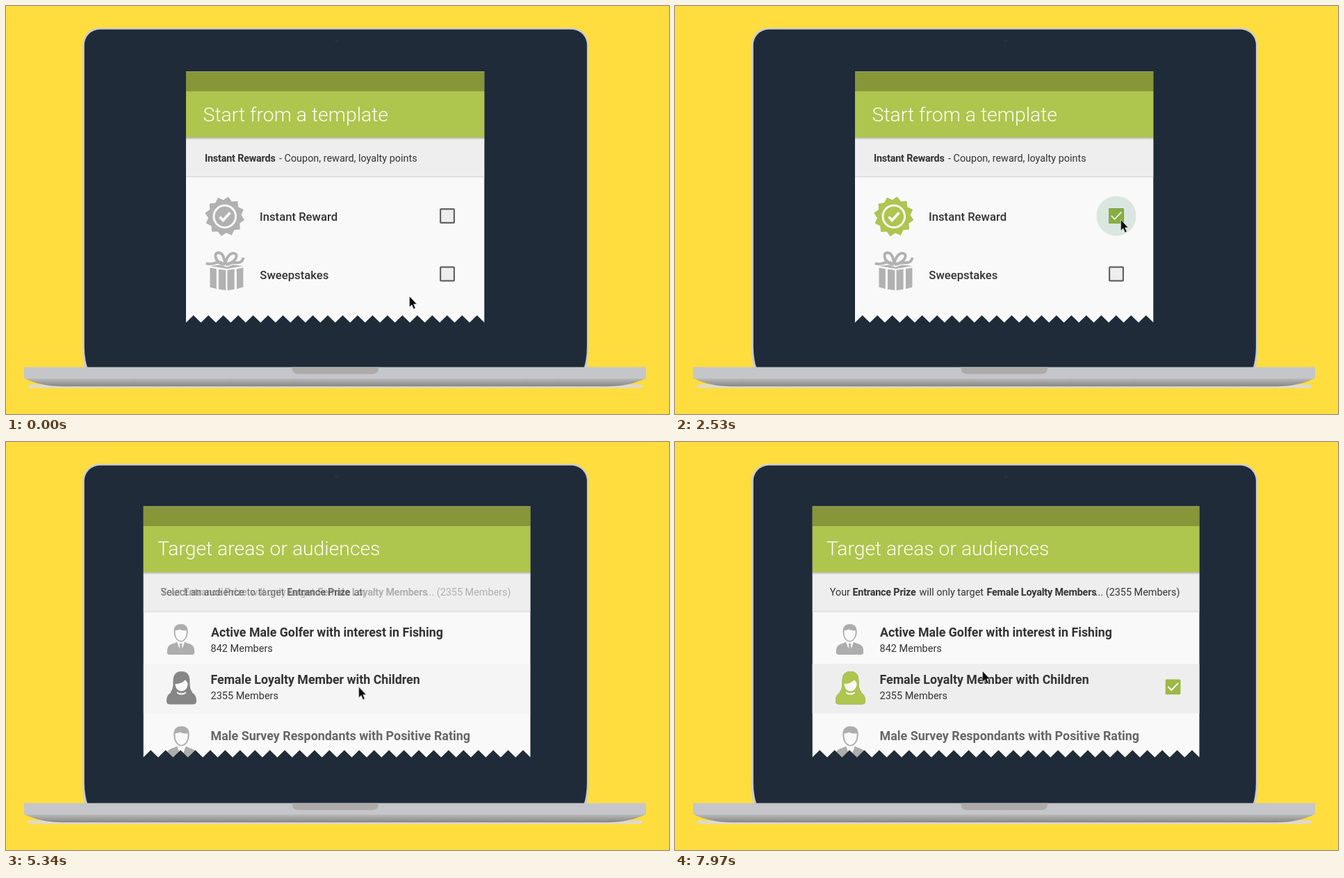
An HTML page that plays this animation: 954x587 px, repeating every 8000 ms.

```html
<!DOCTYPE html>
<html lang="en">
<head>
<meta charset="utf-8">
<title>Campaign setup</title>
<style>
  html, body { margin: 0; width: 100%; height: 100%; overflow: hidden; background: #ffdd3f; }
  svg { display: block; width: 954px; height: 587px; }
  text { font-family: Roboto, sans-serif; white-space: pre; }
  .note [font-weight="700"] { letter-spacing: -.2px; }
</style>
</head>
<body>
<svg id="stage" viewBox="0 0 954 587" xmlns="http://www.w3.org/2000/svg"></svg>
<script>
const LOOP = 8000;
const GREEN = '#aec54e', TICK = '#9cb845', GREY = '#b1b1b1', INK = '#333', PAPER = '#f9f9f9';

const text = (x, y, size, weight, str, fill = INK) =>
  `<text x="${x}" y="${y}" font-size="${size}" font-weight="${weight}" fill="${fill}">${str}</text>`;

// A line of text in parts: [x, weight, string]
const note = (id, y, parts) =>
  `<g id="${id}" class="note">${parts.map(([x, w, s]) => text(x, y, 14.4, w, s)).join('')}</g>`;

const rect = (x, y, w, h, fill, more = '') =>
  `<rect x="${x}" y="${y}" width="${w}" height="${h}" fill="${fill}" ${more}/>`;

function sheetPath(x, y, w) {
  const n = Math.round(w / 21.45), step = w / n / 2, low = y + 361.5;
  let d = `M${x} ${y}H${x + w}V${low}`;
  for (let i = 2 * n - 1; i >= 0; i--) d += `L${x + i * step} ${i % 2 ? low - 10.5 : low}`;
  return d + 'Z';
}

function sheet(id, x, y, w, content) {
  return `<clipPath id="${id}-clip"><path d="${sheetPath(x, y, w)}"/></clipPath>
    <g id="${id}" clip-path="url(#${id}-clip)">
      ${rect(x, y, w, 364, PAPER)}
      ${rect(x, y + 95, w, 57, '#eee')}
      ${rect(x, y + 95, w, 3.5, 'url(#shade)')}
      ${rect(x, y + 151, w, 1.2, '#d8d8d8')}
      ${rect(x, y + 152.2, w, 1, '#efefef')}
      ${rect(x, y, w, 29, '#869639')}
      ${rect(x, y, w, 1, '#a0ab68')}
      ${rect(x, y + 28.7, w, 66.5, GREEN)}
      ${content}
    </g>`;
}

const emptyBox = (x, y) => rect(x + 1.1, y + 1.1, 19.8, 19.8, '#eee', 'rx="1" stroke="#636363" stroke-width="2.2"');

const tickedBox = (x, y) => rect(x, y, 21.7, 21.7, TICK, 'rx="1.5"') +
  `<path d="M${x + 3.7} ${y + 10.4}l4.9 5 9.7-10.1" fill="none" stroke="#fff" stroke-width="2"/>`;

function badge(fill) {
  const pts = Array.from({ length: 24 }, (_, i) => {
    const r = i % 2 ? 22.8 : 27.7, a = (i * 15 - 80) * Math.PI / 180;
    return `${(r * Math.cos(a)).toFixed(2)},${(r * Math.sin(a)).toFixed(2)}`;
  });
  return `<g transform="translate(314.8 302.8)" fill="none">
    <polygon points="${pts.join(' ')}" fill="${fill}" stroke="${fill}" stroke-width="1.6" stroke-linejoin="round"/>
    <circle r="15.8" stroke="${PAPER}" stroke-width="3"/>
    <path d="M-7.3.5l5 5L7.6-5.6" stroke="${PAPER}" stroke-width="3.8"/>
  </g>`;
}

const gift = `<g fill="${GREY}">
    <path d="M293.5 376.5l9.3 1.7v28.8l-9.3-2.4ZM306 378.7l10.3 1.4v29l-10.3-1.7ZM318.6 380l10-1.4v29l-10 1.6ZM332 378.2l9.4-1.7v28l-9.4 2.4Z"/>
    <path d="M294 374l14-1.6 9.5 3.4 9-3.4 15.5 1.6-24 4Z"/>
    <g fill="none" stroke="${GREY}" stroke-width="3.9">
      <path d="M315 372C301 370 298 356 305 355S315 364 315 372"/>
      <path d="M316 372C316 362 323 354 329 356S331 369 316 372"/>
      <path d="M313 372C305 363 298 375 288 370M319 372C327 365 339 375 341.5 362"/>
    </g>
  </g>`;

const man = (x, y, scale, tie) => `<g transform="translate(${x} ${y}) scale(${scale})" fill="#adadad">
    <path d="M-19.8 41Q-20.5 31-13 28.5Q-7 27-5 25H5Q7 27 13 28.5Q20.5 31 19.6 41Q19.5 44 16 44H-16Q-19.8 44-19.8 41Z"/>
    <path d="M-6 24.5L0 41 6 24.5Z" fill="${PAPER}"/>
    ${tie ? '<path d="M-2 28H2L1.2 31 2.3 36 0 41-2.3 36-1.2 31Z"/>' : ''}
    <path d="M0 0C7 0 10.5 4 10 12C9.6 20 5 25.5 0 25.5S-9.6 20-10 12C-10.5 4-7 0 0 0Z"/>
    <path d="M-8 9Q-4 9-2 7.5Q3 10 8 9C9 18 4.5 24 0 24S-9 18-8 9Z" fill="${PAPER}"/>
  </g>`;

const woman = fill => `<g transform="translate(252.5 330)" fill="${fill}">
    <path d="M-21.5 43Q-22 31-9 28H9Q22 31 21.5 43Q21.5 47.6 16 47.6H-16Q-21.5 47.6-21.5 43Z"/>
    <path d="M0 0C-10 0-12 7-12 15C-12 23-13 27-16 30Q-10 32-8 29H8Q10 32 16 30C13 27 12 23 12 15C12 7 10 0 0 0Z"/>
    <path d="M-9 18Q0 18 5 12.5Q8.500 14 9 18C9 25 4 28.500 0 28.500S-9 25-9 18Z" fill="${PAPER}"/>
    <path d="M-6.500 29.500Q0 33.500 6.500 29.500V31.500Q0 36-6.500 31.500Z" fill="${PAPER}"/>
  </g>`;

const laptop = `
  <path d="M113 521Q110.300 508 110.300 496V55.500A24 24 0 0 1 134.300 31.500H814A24 24 0 0 1 838 55.500V496Q838 508 835.500 521Z" fill="#c9cbd3"/>
  <path d="M117.500 521Q112.800 508 112.800 490V56A22.200 22.200 0 0 1 135 33.800H813.700A22.200 22.200 0 0 1 835.900 56V490Q835.900 508 831.500 521Z" fill="#1f2b38"/>
  <path d="M473.500 48.500l2 3 2.500-3" fill="none" stroke="#323c47"/>
  ${rect(32, 544.8, 884, 4.8, '#dcdad4', 'rx="2.4"')}
  <path d="M26 535.500H921C905 543 890 547 862 547.300H85C57 547 42 543 26 535.500Z" fill="url(#under)"/>
  ${rect(26, 519.5, 895, 16.5, '#c5c6ca')}
  <path d="M411.500 519.500H536V521Q536 529.500 527 529.500H420.500Q411.500 529.500 411.500 521Z" fill="#aeabab"/>`;

const templates = sheet('templates', 259, 94, 429.5,
  text(283.6, 165.6, 28.4, 300, 'Start from a template', '#fdfef8') +
  note('kinds', 224.3, [[286, 700, 'Instant Rewards'], [393, 400, '- Coupon, reward, loyalty points']]) +
  badge(GREY) + gift +
  text(365, 309.3, 16.7, 500, 'Instant Reward') +
  text(365.3, 392.5, 16.7, 500, 'Sweepstakes') +
  emptyBox(624, 291) + emptyBox(624, 374.5) +
  `<g id="reward">${badge(GREEN)}${tickedBox(624, 291.2)}</g>
   <circle id="ripple" cx="635" cy="302" r="28.6" fill="rgba(0,100,50,.12)"/>`);

const audiences = sheet('audiences', 197.5, 92.3, 557.2,
  `<g id="row">${rect(197, 319, 558, 71.5, '#eee')}</g>` +
  text(218, 162.6, 28.3, 300, 'Target areas or audiences', '#fdfef8') +
  note('ask', 221.3, [[222.4, 400, 'Select an audience to target'],
    [404.2, 700, 'Entrance Prize'], [500.4, 400, 'at:']]) +
  note('answer', 221.3, [[222.8, 400, 'Your'], [255.4, 700, 'Entrance Prize'],
    [351.4, 400, 'will only target'], [448.4, 700, 'Female Loyalty Members'],
    [604.8, 400, '... (2355 Members)']]) +
  man(251.6, 262, 1, true) + woman('#868686') + man(252.5, 409, 1.12, false) +
  text(295, 280.2, 17.8, 700, 'Active Male Golfer with interest in Fishing') +
  text(294.5, 301.6, 14.5, 400, '842 Members') +
  text(294.5, 348.2, 17.8, 700, 'Female Loyalty Member with Children') +
  text(294.5, 369.6, 14.5, 400, '2355 Members') +
  text(294.5, 429.2, 17.9, 700, 'Male Survey Respondants with Positive Rating', '#666') +
  `<g id="chosen">${woman(GREEN)}${tickedBox(705.7, 341.6)}</g>`);

const gradient = (id, from, to) => `<linearGradient id="${id}" x2="0" y2="1">
  <stop stop-color="${from}"/><stop offset="1" stop-color="${to}"/></linearGradient>`;

document.getElementById('stage').innerHTML = `
  <defs>${gradient('shade', 'rgba(0,0,0,.26)', 'rgba(0,0,0,0)')}${gradient('under', '#bcbcbd', '#858585')}</defs>
  ${laptop}${templates}${audiences}
  <g id="cursor">
    <path d="M.4.4V16.2L4 12.9 6.5 18.9 9.2 17.7 6.7 11.9H11.3Z"
      fill="#0c0c0c" stroke="#fff" stroke-opacity=".75" stroke-width=".8"/>
  </g>`;

function play(id, frames) {
  document.getElementById(id).animate(
    [{ ...frames[0], offset: 0 }, ...frames, { ...frames.at(-1), offset: 1 }],
    { duration: LOOP, iterations: Infinity });
}

// Steps: [ms, opacity]
const fade = (id, steps) => play(id, steps.map(([t, opacity]) => ({ offset: t / LOOP, opacity })));

// Steps: [ms, x, y, easing to the next step]
const move = (id, steps) => play(id, steps.map(([t, x, y, easing = 'linear']) =>
  ({ offset: t / LOOP, transform: `translate(${x}px, ${y}px)`, easing })));

fade('templates', [[4650, 1], [4650, 0]]);
fade('audiences', [[4650, 0], [4650, 1]]);
fade('reward', [[2530, 0], [2530, 1]]);
fade('ripple', [[2530, 0], [2530, 1], [2620, 1], [3000, 0]]);
fade('ask', [[5190, 1], [5640, 0]]);
fade('answer', [[5190, 0], [5640, 1]]);
fade('row', [[5190, 0], [5640, 1]]);
fade('chosen', [[5910, 0], [5970, 1]]);

move('cursor', [
  [0, 580, 417, 'ease-in-out'], [810, 587, 304, 'ease-out'], [1000, 640, 303],
  [2530, 640, 303], [2530, 641, 307, 'ease-in-out'], [3280, 667, 421],
  [4650, 667, 421], [4650, 694, 520, 'ease-out'], [4950, 520, 350],
  [5190, 520, 350, 'ease-in-out'], [5640, 465, 357],
  [7610, 465, 357, 'ease-in-out'], [7970, 442, 329],
]);
</script>
</body>
</html>
```
